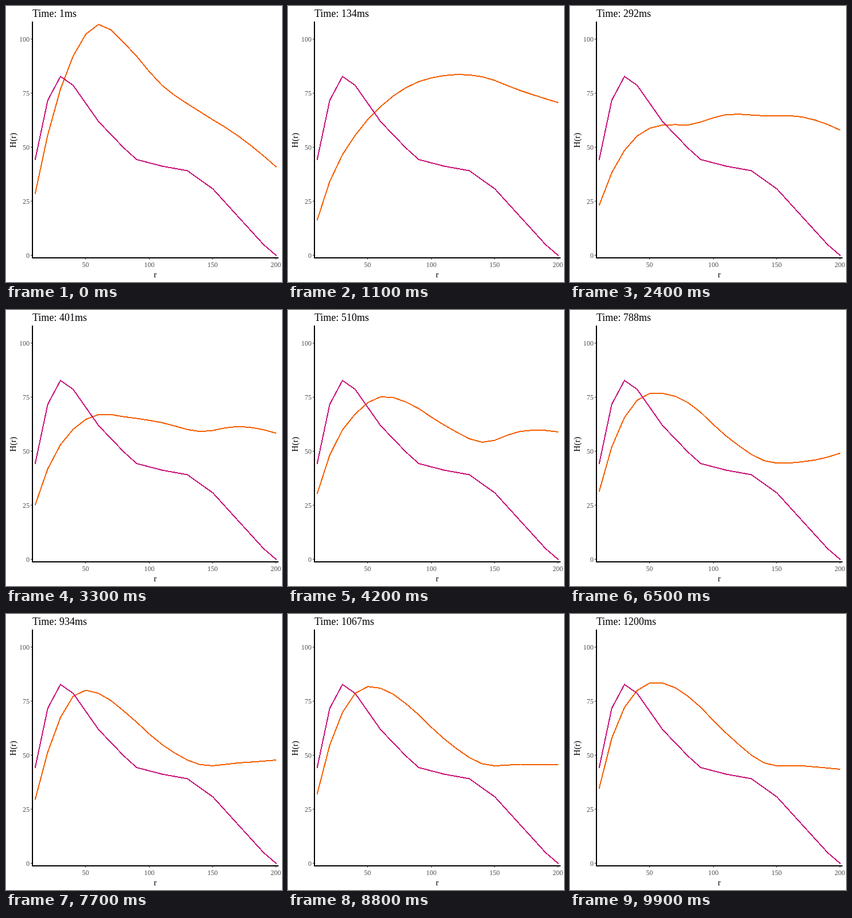
Write an HTML page that moves like this. It is 480x480 px and loops after 10000 ms.

```html
<!DOCTYPE html>
<html lang="en">
<head>
<meta charset="utf-8">
<title>H(r) over time</title>
<style>
  html, body { margin: 0; width: 100%; height: 100%; overflow: hidden; background: #fff; }
  svg { display: block; width: 480px; height: 480px; }
  text { font-family: "Liberation Serif", "Times New Roman", serif; font-size: 15px; fill: #000; }
  #title { font-size: 18px; }
  .tick { font-size: 12px; fill: #4d4d4d; }
  polyline { fill: none; stroke-width: 2; stroke-linejoin: round; shape-rendering: crispEdges; }
</style>
</head>
<body>
<svg id="chart" viewBox="0 0 480 480">
  <polyline id="moving" stroke="#f55f00"/>
  <polyline id="fixed" stroke="#c9157d"/>
  <text id="title" x="46" y="19">Time: 1ms</text>
  <text x="259.5" y="472" text-anchor="middle">r</text>
  <text transform="translate(17 233.5) rotate(-90)" text-anchor="middle">H(r)</text>
</svg>
<script>
const STEP = 100, STEPS = 100, END_MS = 1200;
const byId = id => document.getElementById(id);
const chart = byId('chart');
const xOf = r => 28.5 + 2.208 * r;

// Corners of the steady curve: r, height on the stage
const corners = [[10, 268], [20, 164], [30, 122.5], [40, 138], [60, 201], [80, 247],
  [90, 267], [110, 278.5], [130, 286.5], [150, 318], [190, 415], [200, 434]];

// Key heights of the moving curve at the r values in knots
const knots = [10, 20, 40, 60, 80, 110, 140, 170, 200];
const poses = [
  { at: 0, y: [327, 224, 87, 32, 64, 138, 184, 226, 280] },
  { at: 11, y: [373, 305, 225, 175, 142, 121, 123, 147, 168] },
  { at: 24, y: [347, 290, 226, 207, 207, 189, 191, 193, 216] },
  { at: 42, y: [320, 252, 181, 151, 160, 200, 230, 211, 212] },
  { at: 65, y: [316, 238, 157, 145, 161, 219, 262, 264, 249] },
  { at: 77, y: [323, 240, 143, 138, 169, 227, 262, 259, 254] },
  { at: 99, y: [304, 216, 133, 120, 143, 207, 259, 264, 270] }
];

function poseAt(n) {
  const k = Math.max(1, poses.findIndex(p => p.at >= n));
  const a = poses[k - 1], b = poses[k], p = (n - a.at) / (b.at - a.at);
  return a.y.map((y, i) => y + (b.y[i] - y) * p);
}

// Smooth curve through the knots, with parabolic slopes
function spline(xs, ys) {
  const last = xs.length - 1;
  const h = i => xs[i + 1] - xs[i];
  const rise = i => (ys[i + 1] - ys[i]) / h(i);
  const slope = i =>
    i === 0 ? 2 * rise(0) - slope(1) :
    i === last ? 2 * rise(last - 1) - slope(last - 1) :
    (rise(i - 1) * h(i) + rise(i) * h(i - 1)) / (h(i - 1) + h(i));
  return x => {
    let i = 0;
    while (i < last - 1 && x > xs[i + 1]) i++;
    const t = (x - xs[i]) / h(i), u = 1 - t;
    return u * u * (1 + 2 * t) * ys[i] + t * t * (1 + 2 * u) * ys[i + 1]
      + h(i) * t * u * (u * slope(i) - t * slope(i + 1));
  };
}

const hump = (n, a, b) => n > a && n < b ? Math.sin(Math.PI * (n - a) / (b - a)) : 0;

// The left end sinks a little between some poses
const sag = n => 26 * hump(n, 0, 11) + 6 * hump(n, 24, 42) + 15 * hump(n, 52, 65);

function plot(id, points) {
  byId(id).setAttribute('points', points.map(([r, y]) => `${xOf(r)},${y}`).join(' '));
}

function add(name, attrs, text = '') {
  const el = document.createElementNS('http://www.w3.org/2000/svg', name);
  for (const key in attrs) el.setAttribute(key, attrs[key]);
  el.textContent = text;
  chart.appendChild(el);
}

function bar(x, y, width, height, fill) {
  add('rect', { x, y, width, height, fill });
}

function axes() {
  for (let r = 50; r <= 200; r += 50) {
    const x = Math.round(xOf(r) - 0.7);
    bar(x, 439, 1, 2, '#333');
    add('text', { class: 'tick', x: x + 0.3, y: 454, 'text-anchor': 'middle' }, r);
  }
  for (let v = 0; v <= 100; v += 25) {
    const y = 434 - 3.76 * v;
    bar(43, y - 1, 2, 1, '#333');
    add('text', { class: 'tick', x: 41, y: y + 4, 'text-anchor': 'end' }, v);
  }
  bar(45, 27, 2, 412, '#000');
  bar(45, 437, 429, 2, '#000');
}

function draw(n) {
  const height = spline(knots, poseAt(n)), drop = sag(n), points = [];
  for (let r = 10; r <= 200; r += 10) {
    points.push([r, height(r) + drop * Math.exp((10 - r) / 70)]);
  }
  plot('moving', points);
  byId('title').textContent = `Time: ${Math.round(1 + (END_MS - 1) * n / (STEPS - 1))}ms`;
}

let start = null, shown = 0;
function tick(now) {
  if (start === null) start = now;
  const n = Math.floor(Math.max(0, now - start) / STEP) % STEPS;
  if (n !== shown) draw(shown = n);
  requestAnimationFrame(tick);
}
axes();
plot('fixed', corners);
draw(0);
requestAnimationFrame(tick);
</script>
</body>
</html>
```
